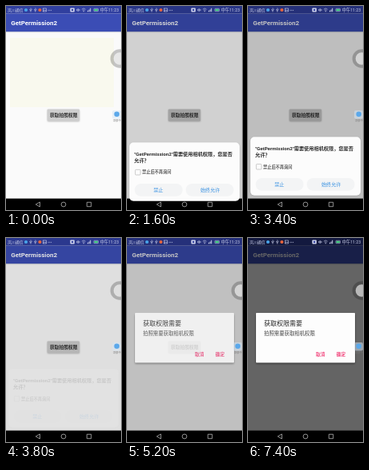
An HTML page that plays this animation: 144x256 px, repeating every 8 s.

```html
<!DOCTYPE html>
<html lang="zh">
<head>
<meta charset="utf-8">
<style>
html, body { margin: 0; width: 100%; height: 100%; overflow: hidden; background: #000; }
svg { display: block; width: 100vw; height: 100vh; }
text { font-family: Roboto, "Noto Sans CJK SC", "Noto Sans CJK", sans-serif; dominant-baseline: central; }
.mid { text-anchor: middle; }
.med { font-weight: 500; }
.bold { font-weight: 700; }
</style>
</head>
<body>
<svg viewBox="0 0 144 256" preserveAspectRatio="none">
  <defs>
    <filter id="soft" x="-20%" y="-30%" width="140%" height="160%"><feGaussianBlur stdDeviation="1.3"/></filter>
  </defs>

  <g id="page">
    <rect width="144" height="256" fill="#fafafa"/>
    <rect id="panel" x="5" y="40" width="130" height="87" fill="#f9f9ee"/>
    <rect width="144" height="9.6" fill="#303f9f"/>
    <rect y="9.6" width="144" height="22.6" fill="#3b4db5"/>
    <rect y="32.2" width="144" height="1" fill="#000" opacity=".12"/>
    <text class="bold" x="6.2" y="21" font-size="8" fill="#fff">GetPermission2</text>
    <rect x="52" y="130.6" width="40" height="14.4" rx="1" opacity=".25" filter="url(#soft)"/>
    <rect id="key" x="51.6" y="129.4" width="40.4" height="15" rx="1" fill="#d0d1d1"/>
    <text class="mid bold" x="72.2" y="136.6" font-size="5.75" fill="#2a2a2a">获取拍照权限</text>
  </g>

  <rect id="dim" width="144" height="242" fill="#000"/>

  <g id="nav">
    <rect y="241.6" width="144" height="14.4" fill="#000"/>
    <g fill="none" stroke="#b4b4b4" stroke-width=".8" stroke-linejoin="round">
      <path d="M42.4 246v6l-5.2-3z"/>
      <circle cx="72" cy="249" r="2.9"/>
      <rect x="101.3" y="246.3" width="5.4" height="5.4"/>
    </g>
  </g>

  <g id="ask">
    <rect x="3" y="165" width="138" height="73" rx="5" opacity=".15" filter="url(#soft)"/>
    <rect x="3" y="164.3" width="138" height="73.4" rx="5" fill="#fcfcfc"/>
    <g class="bold" font-size="6.2" fill="#2c2c2c">
      <text x="9" y="178.8">"GetPermission2"需要使用相机权限，您是否</text>
      <text x="9" y="187.4">允许？</text>
    </g>
    <rect x="10.3" y="198.4" width="6.6" height="6.6" rx="1" fill="none" stroke="#aaa" stroke-width=".6"/>
    <text class="bold" x="19" y="201.5" font-size="5.2" fill="#5a5a5a">禁止后不再询问</text>
    <g fill="#f3f4f5">
      <rect x="9.6" y="216" width="60" height="15.8" rx="7.9"/>
      <rect x="73.6" y="216" width="60" height="15.8" rx="7.9"/>
    </g>
    <g class="mid" font-size="6.1" fill="#3a92e2">
      <text x="39.3" y="223.7">禁止</text>
      <text x="104.2" y="223.7">始终允许</text>
    </g>
  </g>

  <g id="why">
    <rect x="10" y="96" width="124" height="62" rx="1" opacity=".4" filter="url(#soft)"/>
    <rect x="10" y="94" width="124" height="62.6" rx=".8" fill="#fdfdfd"/>
    <text class="med" x="20" y="107" font-size="8" fill="#222">获取权限需要</text>
    <text x="20" y="120" font-size="6.4" fill="#444">拍照需要获取相机权限</text>
    <g class="mid bold" font-size="5.7" fill="#f2497f">
      <text x="90.8" y="146">取消</text>
      <text x="116.4" y="146">确定</text>
    </g>
  </g>

  <g id="float">
    <circle cx="142.4" cy="66" r="11.8" fill="#000" opacity=".22"/>
    <circle cx="142.4" cy="66" r="7.7" fill="#fff" opacity=".6"/>
    <rect x="133" y="131" width="11" height="10.6" rx="2" fill="#d4e6f5" opacity=".5"/>
    <circle cx="138.7" cy="135.8" r="3.3" fill="#5ba8ea"/>
    <text class="mid" x="138.8" y="144" font-size="3.2" fill="#777">录屏中</text>
  </g>

  <g id="status" fill="#cfd4ee">
    <text x="2" y="5" font-size="4.9">岚川通信</text>
    <circle cx="25" cy="5" r="2.1" fill="#49a5ea"/>
    <g fill="none" stroke="#cfd4ee" stroke-width=".6">
      <path id="plug" d="M31 2.4v5.2M29.8 4v1.2l1.2 1M32.2 3.6v1.2l-1.2 1"/>
      <use href="#plug" x="5.8"/>
      <rect x="46.4" y="3" width="4" height="4"/>
      <path d="M46.6 6.6l1.4-1.8 1 1 .6-.6 .8 1.2"/>
      <path d="M88 5q2.3-3 4.6 0q-2.3 3-4.6 0z"/>
      <path d="M94.8 4.2q2.4-2.4 4.8 0M95.8 5.5q1.4-1.4 2.8 0"/>
      <rect x="110" y="3.3" width="5.4" height="3.4" rx=".5"/>
    </g>
    <circle cx="42.4" cy="5" r="2.1" fill="#e8643c"/>
    <circle cx="53" cy="5.2" r=".5"/><circle cx="54.8" cy="5.2" r=".5"/><circle cx="56.6" cy="5.2" r=".5"/>
    <rect x="80.4" y="2.4" width="5.4" height="5.2" rx=".8"/>
    <circle cx="83.1" cy="5" r="1.2" fill="#303f9f"/>
    <circle cx="90.3" cy="5" r=".8"/>
    <circle cx="97.2" cy="6.7" r=".6"/>
    <path d="M102 7.2h1v-1.4h-1zM103.6 7.2h1v-2.8h-1zM105.2 7.2h1v-4.4h-1z"/>
    <rect x="110.6" y="3.9" width="4.2" height="2.2" fill="#3fd07c"/>
    <text x="117.8" y="5" font-size="5.2">中午11:23</text>
  </g>
</svg>
<script>
const LOOP = 8000, STEP = 200;
const $ = id => document.getElementById(id);
const parts = Object.fromEntries(
  ['panel', 'key', 'dim', 'ask', 'why', 'float'].map(id => [id, $(id)]));

// Linear track through [time, value] points.
function track(t, points) {
  let [t0, v0] = points[0];
  for (const [t1, v1] of points) {
    if (t < t1) return v0 + (v1 - v0) * Math.max(0, (t - t0) / (t1 - t0));
    [t0, v0] = [t1, v1];
  }
  return v0;
}

const fade = (part, value) => part.setAttribute('opacity', value.toFixed(3));
const gray = v => `rgb(${v},${v},${v})`;

const dimTrack = [[400, 0], [1600, .165], [2200, .24], [3400, .24],
  [4000, .045], [4200, .02], [4800, .02], [5200, .23], [5600, .6]];
const askTrack = [[3400, 1], [3600, .5], [3800, .12], [4000, 0]];
const whyTrack = [[4800, 0], [5200, .8], [5400, 1]];
const floatTrack = [[200, 1], [800, 0], [2800, 0], [3200, 1]];
const pressTrack = [[0, 0], [400, 1], [1000, .6], [3400, .3], [4000, 0], [4400, 0], [4600, 1], [5200, 0]];

function draw(t) {
  fade(parts.panel, track(t, [[0, 1], [1000, 0]]));
  fade(parts.dim, track(t, dimTrack));
  fade(parts.why, track(t, whyTrack));
  fade(parts.float, track(t, floatTrack));
  parts.key.setAttribute('fill', gray(Math.round(206 - 22 * track(t, pressTrack))));

  const p = Math.min(1, Math.max(0, (t - 1000) / 1040));
  const drop = 92 * (1 - p) ** 3;
  parts.ask.setAttribute('transform', `translate(0 ${drop.toFixed(2)})`);
  fade(parts.ask, t < 1000 ? 0 : track(t, askTrack));
}

function tick(now) {
  const t = now % LOOP;
  draw(Math.floor(t / STEP) * STEP);
  requestAnimationFrame(tick);
}
draw(0);
requestAnimationFrame(tick);
</script>
</body>
</html>
```
